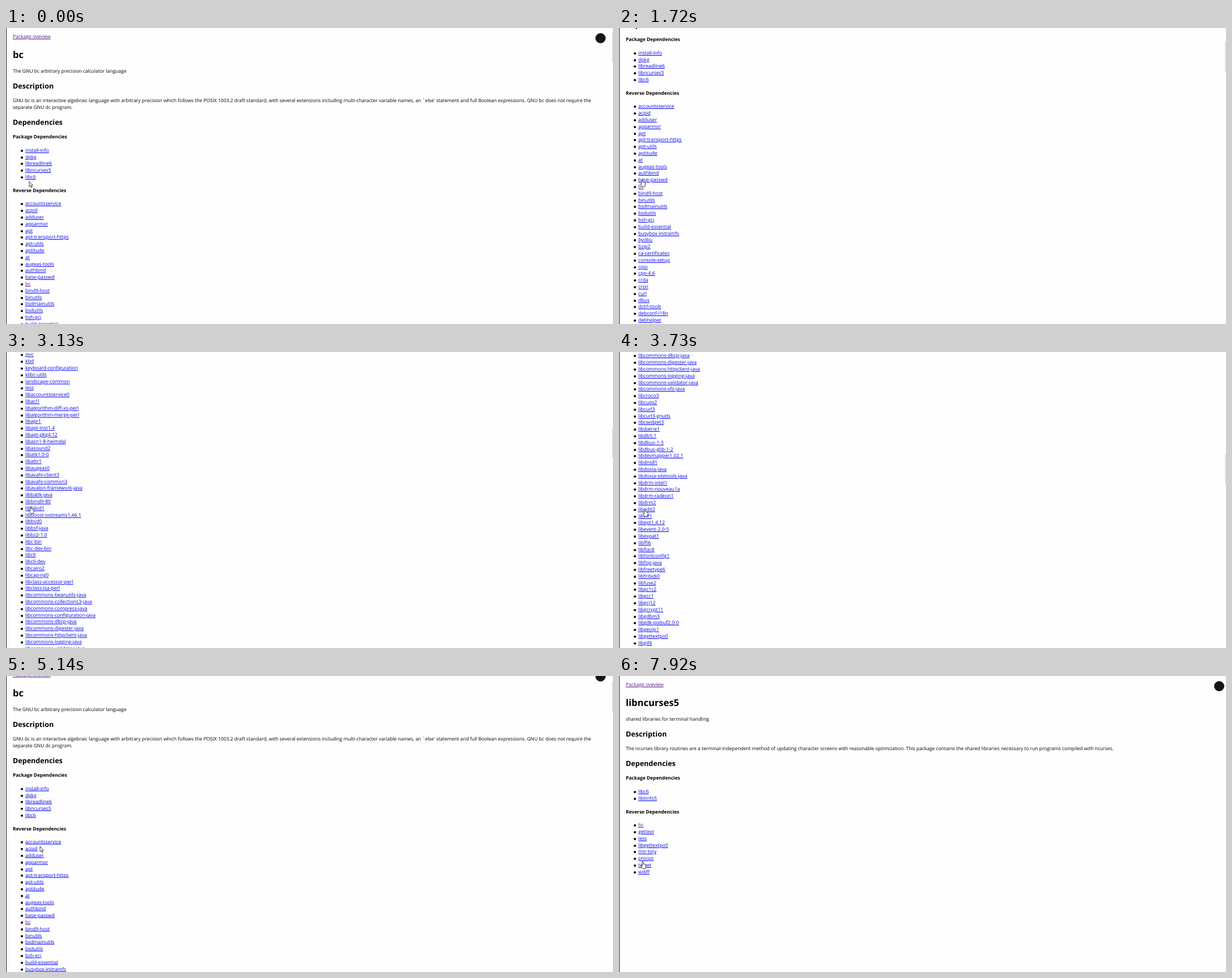
These frames come from a looping animation (1071x523 px, 8000 ms). An HTML page:

```html
<!DOCTYPE html>
<html lang="en">
<head>
<meta charset="utf-8">
<title>Package browser</title>
<style>
html, body { margin: 0; width: 100%; height: 100%; overflow: hidden; background: #fefefe; }
body { position: relative; font: 8.48px/11.8px "Open Sans", "Noto Sans", sans-serif; color: #000; text-rendering: geometricPrecision; }
.page { position: absolute; inset: 0; }
.page div { position: absolute; left: 12px; white-space: nowrap; }
.page .h1 { font-size: 16.55px; font-weight: 700; }
.page .h2 { font-size: 12.55px; font-weight: 700; }
.page .h4 { font-size: 8.42px; font-weight: 700; }
.page .row { left: 34px; }
.row::before { content: ""; position: absolute; left: -8px; top: 4px; width: 4px; height: 4px; border-radius: 50%; background: #000; }
a { font-size: 8.57px; color: #00e; text-decoration: underline; }
a.seen { color: #551a8b; }
a.active { color: #e00; }
.page .mark { top: 8.5px; width: 18px; height: 18px; border-radius: 50%; background: #161514; }
#edge { position: absolute; left: 0; top: 0; width: 1px; height: 100%; background: #222; }
#thumb { position: absolute; left: 1070px; top: 8px; width: 1px; height: 52.5px; background: #c4c4c4; }
#cursor { position: absolute; left: 0; top: 0; overflow: visible; pointer-events: none; fill: #fff; stroke: #111; stroke-width: .8; stroke-linejoin: round; }
</style>
</head>
<body>
<div id="edge"></div>
<div id="thumb"></div>
<svg id="cursor" width="1" height="1"><path id="shape"/></svg>
<script>
const PERIOD = 8000, ROW = 11.8;
const $ = id => document.getElementById(id);

const reverse = `accountsservice acpid adduser apparmor apt apt-transport-https apt-utils aptitude at
augeas-tools authbind base-passwd bc bind9-host binutils bsdmainutils bsdutils bsh-gcj build-essential
busybox-initramfs byobu bzip2 ca-certificates console-setup cpio cpp-4.6 crda cron curl dbus dctrl-tools
debconf-i18n debhelper debianutils dh-apparmor diffutils dmidecode dmsetup dosfstools dpkg dpkg-dev
e2fslibs e2fsprogs ed eject fakeroot file fontconfig ftp fuse g++-4.6 gcc-4.6 genisoimage gettext
gettext-base git gnupg gpgv groff-base grub-common grub-pc grub-pc-bin hdparm html2text
icedtea-6-jre-cacao icedtea-6-jre-jamvm ifupdown info initramfs-tools initramfs-tools-bin initscripts
insserv install-info iproute iptables iputils-ping iputils-tracepath irqbalance isc-dhcp-client
isc-dhcp-common jsvc kbd keyboard-configuration klibc-utils landscape-common less libaccountsservice0
libacl1 libalgorithm-diff-xs-perl libalgorithm-merge-perl libapr1 libapt-inst1.4 libapt-pkg4.12
libasn1-8-heimdal libasound2 libatk1.0-0 libattr1 libaugeas0 libavahi-client3 libavahi-common3
libavalon-framework-java libbatik-java libbind9-80 libblkid1 libboost-iostreams1.46.1 libbsd0
libbsf-java libbz2-1.0 libc-bin libc-dev-bin libc6 libc6-dev libcairo2 libcap-ng0
libclass-accessor-perl libclass-isa-perl libcommons-beanutils-java libcommons-collections3-java
libcommons-compress-java libcommons-configuration-java libcommons-dbcp-java libcommons-digester-java
libcommons-httpclient-java libcommons-logging-java libcommons-validator-java libcommons-vfs-java
libcroco3 libcups2 libcurl3 libcurl3-gnutls libcwidget3 libdatrie1 libdb5.1 libdbus-1-3
libdbus-glib-1-2 libdevmapper1.02.1 libdns81 libdoxia-java libdoxia-sitetools-java libdrm-intel1
libdrm-nouveau1a libdrm-radeon1 libdrm2 libedit2 libelf1 libept1.4.12 libevent-2.0-5 libexpat1 libffi6
libflac8 libfontconfig1 libfop-java libfreetype6 libfribidi0 libfuse2 libgc1c2 libgcc1 libgcj12
libgcrypt11 libgdbm3 libgdk-pixbuf2.0-0 libgeoip1 libgettextpo0 libgif4 libgirepository-1.0-1
libglib2.0-0 libgmp10 libgnutls26 libgomp1 libgpg-error0 libgpm2 libgssapi-krb5-2 libgssapi3-heimdal
libgtk2.0-0 libhcrypto4-heimdal libheimbase1-heimdal libheimntlm0-heimdal libhtml-parser-perl
libhttpclient-java libhx509-5-heimdal libice6 libidn11 libio-pty-perl libisc83 libisccc80 libisccfg82
libiw30 libjasper1 libjaxme-java libjpeg-turbo8 libjson-xs-perl libjson0 libk5crypto3 libkeyutils1
libkrb5-26-heimdal libkrb5-3 libkrb5support0 libldap-2.4-2 liblocale-gettext-perl liblockfile-bin
liblockfile1 liblwres80 liblzma5 liblzo2-2 libmagic1 libmailtools-perl libmount1 libmpc2`;

// Every line is placed by the middle of its letters, just above the middle of its line box.
function makePage(title, summary, description, deps, revs, markX) {
  const page = document.createElement("div");
  page.className = "page";
  const add = (y, type, text) => {
    const el = document.createElement("div");
    el.className = type;
    el.style.top = y + .6 - ROW / 2 + "px";
    el.innerHTML = text;
    page.append(el);
  };
  const link = name => `<a${name == "bc" ? ' class="seen"' : ""}>${name}</a>`;
  let y = 128;
  const list = (heading, names) => {
    add(y, "h4", heading);
    y += 23.7 - ROW;
    for (const name of names.split(/\s+/)) add(y += ROW, "row", link(name));
    y += 23.7;
  };
  add(15.4, "", '<a class="seen">Package oveview</a>');
  add(46, "h1", title);
  add(75.9, "", summary);
  add(102, "h2", "Description");
  for (const line of description) { add(y, "", line); y += ROW; }
  add(y += 26.2 - ROW, "h2", "Dependencies");
  y += 26.4;
  list("Package Dependencies", deps);
  list("Reverse Dependencies", revs);
  page.insertAdjacentHTML("beforeend", `<div class="mark" style="left:${markX - 9}px"></div>`);
  document.body.prepend(page);
  return page;
}

const first = makePage("bc", "The GNU bc arbitrary precision calculator language", [
  "GNU bc is an interactive algebraic language with arbitrary precision which follows the POSIX 1003.2 draft standard, with several extensions including multi-character variable names, an `else' statement and full Boolean expressions. GNU bc does not require the",
  "separate GNU dc program."
], "install-info dpkg libreadline6 libncurses5 libc6", reverse, 1049);
const second = makePage("libncurses5", "shared libraries for terminal handling", [
  "The ncurses library routines are a terminal-independent method of updating character screens with reasonable optimization. This package contains the shared libraries necessary to run programs compiled with ncurses."
], "libc6 libtinfo5", "bc gettext less libgettextpo0 mtr-tiny procps telnet wdiff", 1058.5);
const clicked = [...first.querySelectorAll("a")].find(a => a.textContent == "libncurses5");

const ARROW = "M0 0V9.4L2.1 7.5 3.6 10.9 5.1 10.2 3.6 7H6.3Z";
const HAND = "M-1 6.5V.3Q0-1.3 1 .3V4L4.6 5Q5.8 5.4 5.6 7L4.8 12.4H0L-3.6 7.8Q-3.4 6-1 7.8Z";

const ticks = [0, 150, 1020, 1160, 1300, 1440, 1580, 1720,
  1990, 2130, 2280, 2430, 2600, 2740, 2880, 3010, 3130, 3280, 3430, 3580, 3730, 3880, 4020, 4150,
  4280, 4410, 4540, 4690, 4840, 4990, 5140, 5270,
  5730, 5860, 5990, 6120, 6260, 6390, 6530, 6660, 6810, 7340, 7480, 7630, 7780, 7920];
const scrollKeys = [[1860, 172], [2600, 834.5], [3730, 1720], [4400, 2207]];
const cursorKeys = [[0, 41, 271], [150, 41, 268], [2430, 41, 268], [2600, 42, 269], [3730, 45.5, 278],
  [4540, 60, 301], [5600, 60, 301], [6120, 59, 443], [6530, 61, 255], [7200, 61, 255], [7920, 42, 328]];

const ease = u => {
  u = Math.min(1, Math.max(0, u));
  return u < .5 ? 4 * u ** 3 : 1 - 4 * (1 - u) ** 3;
};

function track(keys, t) {
  const i = keys.findIndex(k => k[0] > t);
  if (i < 0) return keys[keys.length - 1].slice(1);
  const a = keys[i - 1], b = keys[i], u = (t - a[0]) / (b[0] - a[0]);
  return a.slice(1).map((v, j) => v + (b[j + 1] - v) * u);
}

function scrollAt(t) {
  if (t < 1860) return 172 * ease((t - 900) / 820);
  if (t < 4400) return track(scrollKeys, t)[0];
  return 2207 * (1 - ease((t - 4400) / 846));
}

function draw(now) {
  const t = ticks.findLast(k => k <= now % PERIOD);
  const scroll = scrollAt(t), opened = t >= 6810;
  first.style.display = opened ? "none" : "";
  second.style.display = opened ? "" : "none";
  $("thumb").style.display = opened ? "none" : "";
  first.style.transform = `translateY(${-scroll}px)`;
  $("thumb").style.transform = `translateY(${scroll * .1004}px)`;
  clicked.className = t >= 6660 ? "active" : "";

  const [x, y] = track(cursorKeys, t);
  const hovered = document.elementFromPoint(x, y);
  $("shape").setAttribute("d", hovered && hovered.tagName == "A" ? HAND : ARROW);
  $("shape").setAttribute("transform", `translate(${x} ${y})`);
}

const start = performance.now();
(function loop() {
  draw(performance.now() - start);
  requestAnimationFrame(loop);
})();
</script>
</body>
</html>
```
